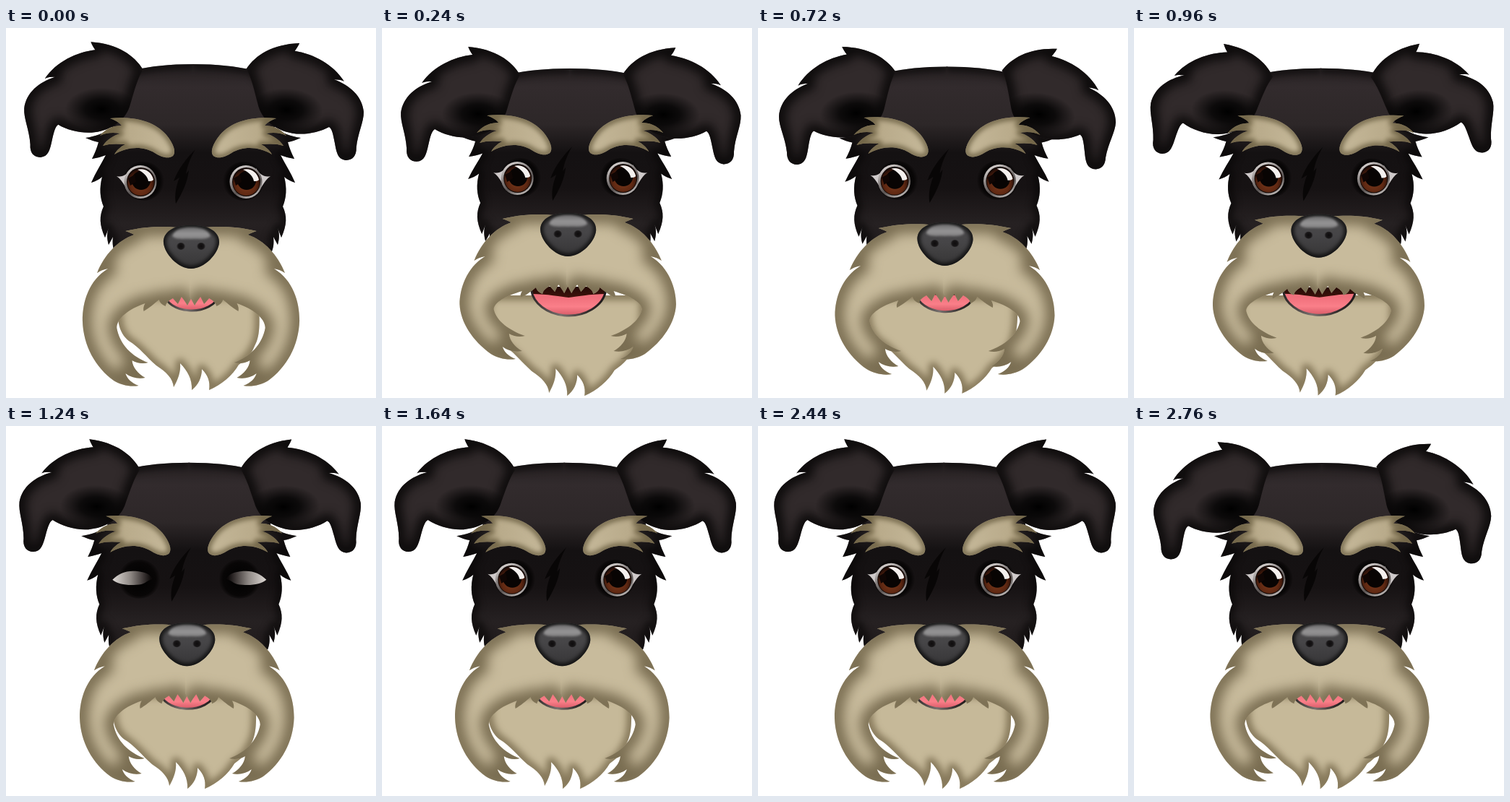
These frames come from a looping animation (512 px wide and 512 px high, 2800 ms). An HTML page with a canvas:

```html
<!DOCTYPE html>
<html>
<head>
<meta charset="utf-8">
<style>
html, body { margin: 0; width: 100%; height: 100%; overflow: hidden; background: #fff; }
canvas { display: block; width: 100vw; height: 100vh; }
</style>
</head>
<body>
<canvas id="stage" width="512" height="512"></canvas>
<script>
const ctx = document.getElementById('stage').getContext('2d');
const LOOP = 2800, NOD = 400, STEP = 40, TAU = Math.PI * 2;
const clamp = v => Math.max(0, Math.min(1, v));

// Sideways drift of the head: [time, offset]
const SWAY = [[0, 0], [160, .6], [240, 1.2], [580, 3.6], [720, 2.5], [960, -.5], [1240, -5.7],
  [1640, -6.7], [2120, -4.6], [2480, -1.4], [2760, 1], [2800, 0]];
// One nod, in tenths: how far the jaw opens and how far the skull drops
const OPEN = [0, .04, .25, .55, .9, 1.12, 1, .55, .23, .05];
const DROP = [0, .12, .4, .7, .95, 1.1, 1, .85, .6, .15];

const EAR = 'M190,58 C178,38 155,22 118,19 C120,24 122,27 124,30 C98,33 70,46 54,69 C58,67 62,67 68,67 ' +
  'C46,74 28,88 25,110 C24,124 32,140 33,160 C32,172 38,178 47,178 C58,177 60,168 63,155 ' +
  'C66,142 68,135 72,133 C85,141 105,146 122,144 C145,141 166,128 172,105 C178,86 182,70 190,58';
const FACE = 'M260,50 C225,50 200,53 178,58 C158,75 148,105 146,138 C135,146 124,150 110,152 C117,155 122,157 128,158 ' +
  'C126,166 123,173 119,181 C126,180 132,178 138,176 C132,188 124,200 118,214 C124,212 128,210 133,206 ' +
  'C129,222 130,235 135,247 C129,260 129,272 137,290 L142,277 C139,285 140,293 142,300 L148,289 ' +
  'C147,298 148,304 150,309 L175,328 L260,330';
const BROW = 'M144,125 C175,122 205,128 222,148 C232,160 236,172 231,177 C224,182 214,178 206,173 ' +
  'C190,163 168,164 150,175 C153,169 159,164 165,161 C153,160 142,160 134,163 C140,154 150,148 158,146 ' +
  'C148,144 138,145 130,149 C139,138 150,135 160,135 C156,130 150,127 144,125 Z';
const MUZZLE = 'M258,279 C235,275 205,272 166,281 C170,282 174,284 178,286 ' +
  'C155,294 137,314 127,339 C131,336 136,334 142,333 C116,349 107,378 107,405 C108,440 125,470 150,488 ' +
  'C160,494 172,497 184,495 C174,491 168,485 166,478 C174,484 184,486 193,484 C183,478 176,470 175,460 ' +
  'C182,464 190,465 197,463 C175,455 158,438 154,415 C154,402 170,389 193,381 C191,385 190,388 191,392 ' +
  'C198,388 206,381 212,376 C213,380 216,383 221,385 C222,380 226,377 231,374 L238,382 L243,372 ' +
  'C246,376 249,380 251,384 L258,371';
const CHIN = 'M160,370 C150,400 156,422 170,433 C185,442 194,455 208,467 C222,476 231,485 232,497 ' +
  'C238,486 242,476 241,464 C251,474 258,486 257,501 C266,494 271,484 271,472 C279,480 283,489 281,501 ' +
  'C298,494 314,480 322,466 C334,458 340,450 344,440 C353,425 351,400 349,370 Z';
const NOSE = 'M256,273 C280,272 296,282 295,297 C294,312 275,333 256,333 C238,333 219,312 218,297 ' +
  'C217,282 233,272 256,273 Z';

function trace(d, warp) {
  if (!warp) return new Path2D(d);
  return new Path2D(d.replace(/([\d.]+),([\d.]+)/g, (_, x, y) => warp(+x, +y).join(',')));
}

function group(draw, dx = 0, dy = 0) {
  ctx.save();
  ctx.translate(dx, dy);
  draw();
  ctx.restore();
}

function mirrored(center, draw) {
  group(() => draw('left'));
  ctx.save();
  ctx.translate(center * 2, 0);
  ctx.scale(-1, 1);
  draw('right');
  ctx.restore();
}

function fill(path, style) {
  ctx.fillStyle = style;
  ctx.fill(path);
}

// Soft shading that fades inward from the edge
function shadeEdge(path, color, size, alpha) {
  ctx.save();
  ctx.clip(path);
  ctx.filter = `blur(${size * .35}px)`;
  ctx.strokeStyle = color;
  ctx.globalAlpha = alpha;
  ctx.lineJoin = 'round';
  ctx.lineWidth = size;
  ctx.stroke(path);
  ctx.restore();
}

function stops(gradient, list) {
  list.forEach(([at, color]) => gradient.addColorStop(at, color));
  return gradient;
}
const vertical = (y0, y1, ...list) => stops(ctx.createLinearGradient(0, y0, 0, y1), list);
const radial = (x, y, r, ...list) => stops(ctx.createRadialGradient(x, y, 0, x, y, r), list);

function ellipse(x, y, rx, ry, style) {
  ctx.beginPath();
  ctx.ellipse(x, y, rx, ry, 0, 0, TAU);
  ctx.fillStyle = style;
  ctx.fill();
}

function drawFace(open, drop) {
  const warp = (x, y) => {
    const k = clamp((y - 50) / 162);
    return [x, y + 6 * drop * (1 - k) - 5 * open * k];
  };
  const half = trace(FACE, warp);
  mirrored(259, () => {
    fill(half, vertical(50, 310, [0, '#241f20'], [.12, '#322b2d'], [.32, '#2d2728'], [.47, '#141112'],
      [.66, '#161213'], [.85, '#262122'], [1, '#1f1a1b']));
    shadeEdge(half, '#080606', 14, .6);
  });
  group(() => {
    fill(trace('M262,168 C250,180 238,195 232,212 L240,207 C235,220 233,231 235,243 C244,228 251,214 253,197 L249,202 C251,190 256,178 262,168 Z'),
      '#080606');
  }, 0, -4 * open);
}

function drawEars(drop, swing) {
  const ear = trace(EAR);
  const bowl = radial(0, 0, 46, [0, '#000'], [.45, 'rgba(0,0,0,.75)'], [1, 'rgba(0,0,0,0)']);
  group(() => mirrored(260.5, side => {
    const lift = side === 'left' ? 2.5 + 9.5 * swing : 14 * swing;
    ctx.translate(160, 90);
    ctx.rotate(lift / 115);
    ctx.translate(-160, -90);
    fill(ear, '#312a2b');
    shadeEdge(ear, '#080606', 20, .85);
    ctx.clip(ear);
    ctx.translate(132, 112);
    ctx.scale(1.1, .65);
    ellipse(0, 0, 46, 46, bowl);
  }), 0, 7 * drop);
}

function drawBrows(open) {
  const brow = trace(BROW);
  group(() => mirrored(259, () => {
    fill(brow, stops(ctx.createLinearGradient(130, 0, 232, 0), [[0, '#9c8d6c'], [.4, '#b9ab8b'], [1, '#c5b899']]));
    shadeEdge(brow, '#5f5337', 9, .7);
  }), 0, -4 * open);
}

function drawEyeball(x) {
  ctx.save();
  ctx.translate(x, 213);
  ellipse(0, 0, 22.5, 23, stops(ctx.createLinearGradient(-12, -22, 12, 22),
    [[0, '#dcd7d5'], [.35, '#8b8584'], [.65, '#5a5453'], [1, '#c4bfbd']]));
  ellipse(.5, 0, 19.5, 20, '#120805');
  ellipse(.5, .5, 18.5, 18.5, radial(0, 5, 22, [0, '#7a3a1d'], [.6, '#5f2812'], [1, '#220c06']));
  ellipse(1, -2, 13, 13, '#080403');
  fill(new Path2D('M-17,-5 L-8,-10 L-6,0 L-14,5 Z'), '#100604');
  fill(new Path2D('M-4,-17 C5,-20 16,-14 18,-3 C16,-1 14,-1 11,-1 C10,-7 5,-13 -4,-17 Z'), '#f4f0ee');
  ctx.restore();
}

function drawEyes(open, lids) {
  const corner = new Path2D('M153,205 C161,207 168,203 173,194 L173,230 C166,224 163,212 153,205 Z');
  const slit = new Path2D('M153,213 C162,204 172,200 185,201 C197,202 206,205 208,212 C199,215 198,220 186,220 C172,221 160,219 153,213 Z');
  group(() => {
    mirrored(259.5, () => ellipse(190, 212, 29, 27, radial(190, 212, 29, [0, '#000'], [.8, '#080606'], [1, 'rgba(8,6,6,0)'])));
    if (lids < .25) {
      mirrored(259.5, () => fill(slit, stops(ctx.createLinearGradient(155, 0, 206, 0),
        [[0, '#d8d3cf'], [.45, '#8e8884'], [.8, '#3c3635'], [1, '#0c0909']])));
      return;
    }
    if (lids < 1) {
      const clip = new Path2D();
      [186, 332].forEach(x => clip.ellipse(x, 212, 36, 25 * lids, 0, 0, TAU));
      ctx.clip(clip);
    }
    mirrored(259.5, () => fill(corner, '#cfcaca'));
    drawEyeball(186);
    drawEyeball(332);
  }, 0, -5 * open);
}

function drawChin(drop) {
  const warp = (x, y) => {
    const k = clamp((y - 400) / 70);
    return [x + (x - 255) * .12 * drop * (1 - k) - 2 * drop * k, y + 8 * drop * k];
  };
  const chin = trace(CHIN, warp);
  fill(chin, '#c6b999');
  shadeEdge(chin, '#64573a', 13, .65);
}

function drawMouth(open) {
  const rx = 38 + 14 * open, top = 366 - 8 * open, bottom = 391 + 7 * open;
  const mouth = new Path2D();
  mouth.ellipse(257, top, rx, bottom - top, 0, 0, Math.PI);
  mouth.closePath();
  fill(mouth, vertical(top, bottom, [0, '#240a06'], [1, '#6b2115']));
  ctx.save();
  ctx.clip(mouth);
  const tongueTop = 371 + 2 * open;
  const tongue = new Path2D(`M${257 - rx},${tongueTop - 5} C${245 - rx / 3},${tongueTop - 5} 247,${tongueTop - 1} 257,${tongueTop} ` +
    `C267,${tongueTop - 1} ${269 + rx / 3},${tongueTop - 5} ${257 + rx},${tongueTop - 5} L${257 + rx},410 L${257 - rx},410 Z`);
  fill(tongue, vertical(tongueTop, bottom, [0, '#f0707c'], [.5, '#fa7f89'], [1, '#d75a67']));
  ctx.restore();
  ctx.beginPath();
  ctx.ellipse(257, top, rx, bottom - top, 0, .12, Math.PI - .12);
  ctx.lineWidth = 3;
  ctx.strokeStyle = stops(ctx.createLinearGradient(257 - rx, 0, 257 + rx, 0),
    [[0, '#2a2424'], [.4, '#77706e'], [.75, '#322c2c'], [1, '#1c1717']]);
  ctx.stroke();
}

function drawMuzzle(open, drop, swing) {
  const warp = (x, y) => [
    x + (256 - x) * .02 * swing,
    y - 17 * open - 20 * drop * clamp((y - 385) / 70)
  ];
  const half = trace(MUZZLE, warp);
  mirrored(256, () => {
    fill(half, '#c8bb9c');
    shadeEdge(half, '#5f5338', 24, .75);
  });
}

function drawNose(open) {
  const nose = trace(NOSE);
  group(() => {
    fill(nose, vertical(274, 333, [0, '#4c4b4c'], [.45, '#464547'], [1, '#363536']));
    shadeEdge(nose, '#0b0a0a', 8, .8);
    const shine = new Path2D('M230,288 C234,278 246,276 256,276 C267,276 279,278 283,288 C276,294 266,291 256,292 C246,291 237,294 230,288 Z');
    ctx.save();
    ctx.filter = 'blur(1.5px)';
    fill(shine, vertical(276, 294, [0, '#6f6e6f'], [.5, '#959495'], [1, '#7b7a7b']));
    ctx.restore();
    mirrored(256, () => ellipse(242, 302, 6, 5, radial(242, 302, 6.5, [0, '#0e0c0d'], [.6, '#181617'], [1, 'rgba(30,28,29,0)'])));
  }, 0, -17 * open);
}

function swayAt(t) {
  const i = SWAY.findIndex(key => key[0] > t);
  const [t0, x0] = SWAY[i - 1], [t1, x1] = SWAY[i];
  return x0 + (x1 - x0) * (t - t0) / (t1 - t0);
}

function render(now) {
  const t = Math.floor(now % LOOP / STEP) * STEP;
  const beat = t % NOD / STEP;
  const open = OPEN[beat], drop = DROP[beat];
  const swing = Math.sin(TAU * (beat / 10 - .06));
  const lids = Math.min(1, Math.abs(t - 1240) / 120 + .1);
  ctx.fillStyle = '#fff';
  ctx.fillRect(0, 0, 512, 512);
  group(() => {
    drawFace(open, drop);
    drawEars(drop, swing);
    drawBrows(open);
    drawEyes(open, lids);
    drawChin(drop);
    drawMouth(open);
    drawMuzzle(open, drop, swing);
    drawNose(open);
  }, swayAt(t), 0);
}

const start = performance.now();
function tick() {
  render(performance.now() - start);
  requestAnimationFrame(tick);
}
tick();
</script>
</body>
</html>
```
